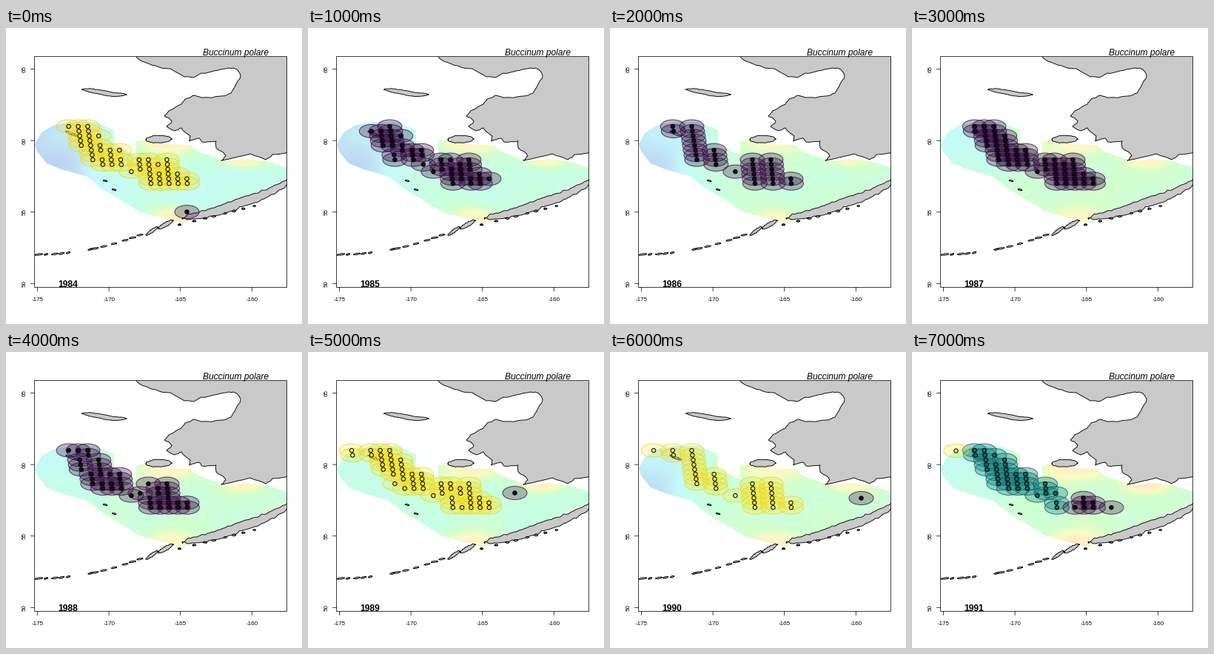
A matplotlib script for the animation above (8 s loop, 400 px wide and 400 px high).

```python
import numpy as np
import matplotlib.pyplot as plt
from matplotlib.animation import FuncAnimation
from matplotlib.collections import EllipseCollection
from matplotlib.patches import Polygon, Rectangle

SIZE, DPI = 400, 100
PX = 72 / DPI
LEFT, TOP, RIGHT, BOTTOM = 38.5, 38.5, 379.5, 350.5
plt.rcParams["font.family"] = "Liberation Sans"

# Key points of the coast and the survey area; the rest is roughened
MAINLAND = [
    (176, 30), (176, 39), (187, 46), (207, 53), (222, 55), (241, 66), (253, 67),
    (264, 61), (281, 58), (301, 54), (312, 56), (317, 64), (313, 72), (304, 88),
    (291, 92), (264, 94), (253, 91), (242, 96), (237, 103), (222, 111),
    (214, 119), (224, 126), (217, 133), (228, 139), (237, 135), (249, 146),
    (248, 153), (261, 149), (265, 154), (284, 153), (284, 162), (297, 173),
    (291, 179), (330, 170), (351, 178), (360, 171), (390, 167), (390, 30)]
SURVEY = [
    (39, 157), (48, 141), (65, 131), (90, 127), (120, 127), (146, 138),
    (146, 158), (176, 172), (176, 153), (190, 151), (215, 157), (250, 158),
    (260, 167), (297, 180), (325, 177), (352, 180), (380, 189), (380, 203),
    (340, 221), (308, 239), (272, 250), (238, 264), (208, 256), (180, 248),
    (158, 234), (128, 216), (110, 201), (75, 191), (55, 183), (42, 167)]

PASTEL = np.array([
    (188, 206, 238), (196, 250, 252), (200, 255, 226), (214, 255, 204),
    (252, 250, 196), (255, 236, 200), (255, 216, 196)]) / 255

# Ellipse fill, ellipse edge, dot fill
PURPLE = ((.2, .08, .24, .3), (.27, .02, .33, .8), (.15, 0, .19, 1))
TEAL = ((.1, .53, .52, .36), (.06, .36, .4, .8), (.08, .42, .41, 1))
YELLOW = ((.99, .89, .1, .22), (.95, .83, .05, .75), (.99, .87, .15, .6))

# First and last station row of each column in the skewed survey grid
BAND = [(0, 1), (0, 4), (0, 7), (2, 8), (5, 8), (5, 8), (9.5, 9.5),
        (7, 9), (7, 12), (8, 12), (7, 12), (10, 12), (11, 12)]
rng = np.random.default_rng(7)


def spot(col, row):
    return 84.7 + 12.85 * col + (1.1 - 0.05 * col) * row, 133 + 6.43 * row


def survey(start=0, stop=13, step=1, keep=1.0):
    """Stations of every step-th column, thinned at random."""
    return [spot(c, r) for c in range(start, stop, step)
            for r in np.arange(BAND[c][0], BAND[c][1] + 1)
            if rng.random() < keep]


FAR_WEST = [spot(-2, 0)]
# West, middle and shore temperature (0 cold to 6 warm), then station groups
YEARS = [
    (0.3, 1.5, 4.7, [(survey(keep=.88), YELLOW), ([(244, 248)], PURPLE)]),
    (0.4, 1.9, 4.4, [(survey(keep=.8), PURPLE)]),
    (0.5, 2.3, 4.0, [(survey(step=2), PURPLE)]),
    (1.3, 2.7, 4.2, [(survey(), PURPLE)]),
    (1.4, 2.4, 4.4, [(survey(keep=.8), PURPLE)]),
    (1.7, 2.1, 4.7, [(FAR_WEST + [spot(-2, 1)] + survey(keep=.85), YELLOW),
                     ([(279, 190)], PURPLE)]),
    (0.6, 2.5, 4.4, [(FAR_WEST + survey(step=2), YELLOW),
                     ([(339, 197)], PURPLE)]),
    (1.5, 2.7, 5.0, [(survey(stop=9, keep=.9), TEAL),
                     (survey(start=11) + [spot(10, 12), spot(14, 12)], PURPLE),
                     (FAR_WEST, YELLOW)]),
]


def heat(west, middle, shore):
    """Cold in the west, with warm shallows along the shores."""
    y, x = np.mgrid[120:270:2, 38:382:2]
    t = middle + (west - middle) / (1 + np.exp((x - 115) / 16))
    for cx, cy, rx, ry in [(220, 155, 50, 18), (320, 180, 30, 9),
                           (222, 255, 35, 16)]:
        bump = np.exp(-((x - cx) / rx) ** 2 - ((y - cy) / ry) ** 2)
        t += (shore - middle) * bump
    t += 0.25 * np.sin(x / 19 + west * 3) * np.sin(y / 13)
    steps = np.arange(len(PASTEL))
    return np.stack([np.interp(t, steps, PASTEL[:, k]) for k in range(3)], -1)


def rough(points, amount, levels=2):
    """Add shifted midpoints, finer at every level."""
    points = np.array(points, float)
    for _ in range(levels):
        mid = (points + np.roll(points, -1, axis=0)) / 2
        mid += rng.uniform(-amount, amount, mid.shape)
        points = np.stack([points, mid], 1).reshape(-1, 2)
        amount /= 2
    return points


def island(spine, half, amount=0.5):
    """Tapered strip of land around a line of key points."""
    xs, ys = zip(*spine)
    u = np.linspace(-1, 1, 9 + int((xs[-1] - xs[0]) / 8))
    x = xs[0] + (u + 1) / 2 * (xs[-1] - xs[0])
    y = np.interp(x, xs, ys)
    w = half * np.sqrt(1 - u ** 2)
    edge = np.r_[np.c_[x, y - w], np.c_[x, y + w][::-1]]
    return rough(edge, amount, 1)


def coast():
    yield rough(MAINLAND, 1.3)
    yield island([(238, 257), (262, 253), (290, 246), (320, 235), (345, 227),
                  (365, 217), (395, 202)], 6.5, 1.5)
    yield island([(103, 83), (118, 85), (145, 90), (163, 90)], 3)
    yield island([(189, 151), (207, 150), (224, 150)], 5, 0.8)
    yield island([(81, 140), (97, 146)], 1.5)
    yield island([(206, 271), (226, 260)], 3, 0.8)
    yield island([(189, 280), (205, 269)], 2.5, 0.8)
    # Island arc in the west, islets south of the peninsula
    for x in (44, 54, 66, 75, 84, 114, 120, 132, 146, 161, 171, 181):
        y, length = 306 - 0.0014 * (x - 44) ** 2, rng.uniform(5, 11)
        yield island([(x - length / 2, y + .7), (x + length / 2, y - .7)], 1, .3)
    for x in np.linspace(236, 334, 8) + rng.uniform(-4, 4, 8):
        y, length = 265 - 0.25 * (x - 236), rng.uniform(3, 6)
        yield island([(x, y), (x + length, y)], 1, .3)
    for x, y in [(134, 206), (146, 218)]:
        yield island([(x - 2.5, y), (x + 2.5, y + 1)], 0.8, .2)


def ellipses(points, w, h, face, edge, z):
    n = len(points)
    c = EllipseCollection([w] * n, [h] * n, [0] * n, units="xy", offsets=points,
                          offset_transform=ax.transData, facecolors=[face],
                          edgecolors=[edge], linewidths=PX, zorder=z)
    return ax.add_collection(c, autolim=False)


def label(x, y, text, size, **kw):
    return ax.text(x, y, text, fontsize=size * PX, ha="center", **kw)


def line(xs, ys):
    ax.plot(xs, ys, color="black", lw=0.75 * PX, zorder=9, snap=False)


fig = plt.figure(figsize=(SIZE / DPI, SIZE / DPI), dpi=DPI, facecolor="white")
ax = fig.add_axes([0, 0, 1, 1])

field = ax.imshow(heat(*YEARS[0][:3]), extent=(38, 382, 270, 120), zorder=1,
                  interpolation="bilinear", aspect="auto")
field.set_clip_path(Polygon(SURVEY, transform=ax.transData))

frame = Rectangle((LEFT, TOP), RIGHT - LEFT, BOTTOM - TOP, fill=False,
                  lw=0.75 * PX, zorder=9, snap=False)
ax.add_patch(frame)
for shore in coast():
    land = ax.add_patch(Polygon(shore, facecolor="#c9c9c9", edgecolor="black",
                                lw=0.9 * PX, joinstyle="round", zorder=2))
    land.set_clip_path(frame)

for i in range(4):
    x, y = 42.5 + 96.6 * i, 55.5 + 96.6 * i
    line([x, x], [BOTTOM, BOTTOM + 5])
    line([LEFT, LEFT - 5], [y, y])
    label(x, 369, f"-{175 - 5 * i}", 8, va="baseline")
    label(25, y, str(65 - 5 * i), 8, va="center", rotation=90)
label(310, 37, "Buccinum polare", 12, va="baseline", style="italic", zorder=10)
year = label(83.5, 350, "", 12, va="baseline", weight="bold", zorder=10)

ax.set_xlim(0, SIZE)
ax.set_ylim(SIZE, 0)
ax.axis("off")

marks = []


def draw(i):
    while marks:
        marks.pop().remove()
    *temps, groups = YEARS[i]
    field.set_data(heat(*temps))
    year.set_text(str(1984 + i))
    for points, (fill, edge, dot) in groups:
        marks.append(ellipses(points, 33, 18, fill, edge, 4))
        marks.append(ellipses(points, 5.4, 5.4, dot, "black", 5))
    return [field, year, *marks]


anim = FuncAnimation(fig, draw, frames=len(YEARS), interval=1000, repeat=True)
plt.show()
```
